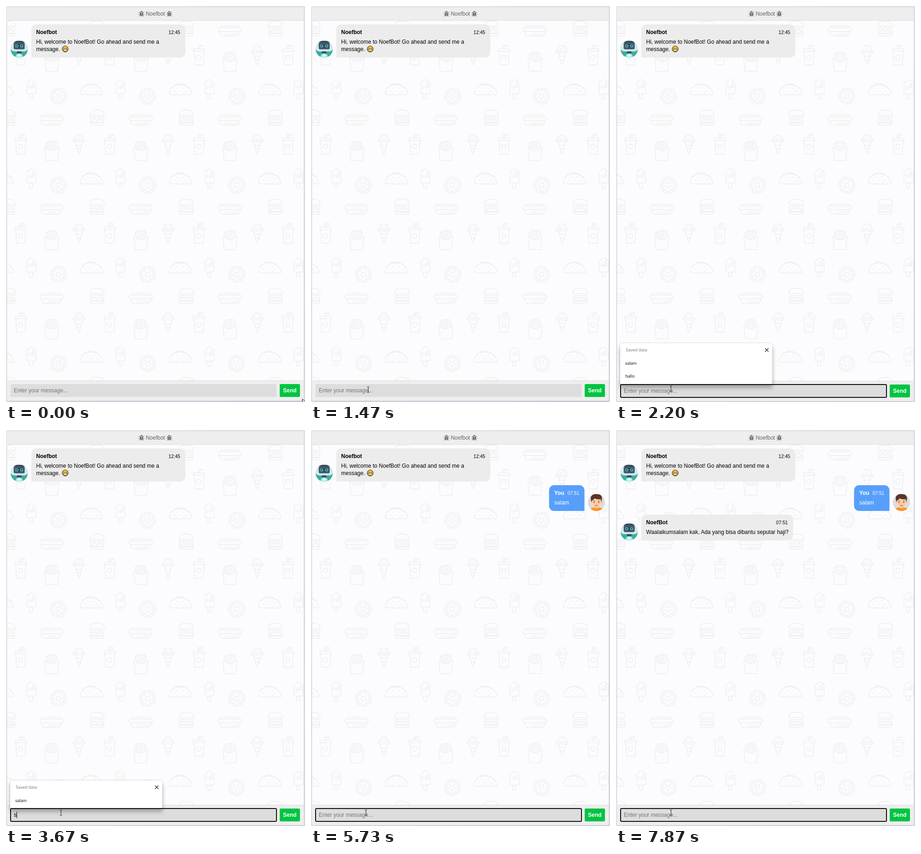
These frames come from a looping animation (650x861 px, 8 s). An HTML page:

```html
<!DOCTYPE html>
<html lang="en">
<head>
<meta charset="utf-8">
<title>Chat window</title>
<style>
html, body { margin: 0; width: 100%; height: 100%; overflow: hidden; }
svg { display: block; width: 650px; height: 861px; }
text { font: 12px "Liberation Sans", Arial, sans-serif; white-space: pre; }
.bold { font-weight: 700; }
.time { font-size: 10.2px; text-anchor: end; }
.mid { text-anchor: middle; }
.popup text { font: 9px "Open Sans", "Noto Sans", sans-serif; }
.line { fill: none; stroke: #ddd; stroke-width: 1.5; stroke-linejoin: round; stroke-linecap: round; }
</style>
</head>
<body>
<svg viewBox="0 0 650 861">
<defs>
  <linearGradient id="page" x1="0" y1="0" x2="1" y2="1">
    <stop offset="0" stop-color="#e9edf4"/><stop offset="1" stop-color="#ccd4e2"/>
  </linearGradient>
  <clipPath id="chatClip"><rect x="2.5" y="32" width="644.5" height="783"/></clipPath>
  <clipPath id="disc"><circle r="18.75"/></clipPath>
  <filter id="shade" x="-10%" y="-30%" width="120%" height="190%">
    <feDropShadow dx="0" dy="0" stdDeviation=".8" flood-opacity=".3"/>
    <feDropShadow dx="0" dy="8" stdDeviation="4.5" flood-opacity=".28"/>
  </filter>

  <g id="food" class="line">
    <!-- ice lolly -->
    <path d="M45 189V168c0-2 2-3 4-3 1-3 4-5 6-5 3 0 4 3 6 4 3 0 4 3 4 6v18c0 2-2 3-4 3-2 0-2-1-4 0H48c-2 0-3-1-3-2zM51 192v8q0 2 2 2h3q2 0 2-2v-8M50 173v7M54 173v4q2 3 4 0v-8q2-2 3 0v9"/>
    <!-- doughnut -->
    <circle cx="114" cy="196" r="17.4"/><circle cx="114" cy="196" r="4.7"/>
    <path id="icing"/>
    <path d="M107 189l2 2M119 188l-1 3M122 196h2M105 198l2-1M111 204l1-2M119 203l2 1"/>
    <!-- taco -->
    <path d="M161.500 189C163 179 170 171 184 171S207 179 210.500 189Q211 193 207 193H166Q161 193 161.500 189zM165 180q0-4 4-4 1-4 5-3 2-4 6-3 4-3 8 0 4-1 6 2 5 0 6 4 5 0 6 5"/>
    <path d="M171 185l2-1M178 179l1 1M184 186h2M190 178l2 1M197 185l2 1M202 189h1M177 190h1M192 190l2-1"/>
    <!-- burger -->
    <path d="M182 238c0-8 6-12 16-12s16 4 16 12zM183 242h30M182 245q3 0 5 3t5-3q3 0 5 3t5-3q3 0 5 3t6-3M184 249q-3 2 0 4h28q3-2 0-4M183 254h30q0 5-5 5h-20q-5 0-5-5z"/>
    <!-- hot dog -->
    <path d="M78 241q0-4 5-4h32q5 0 5 4M77 241h44q3.500 0 3.500 4t-3.500 4H77q-3.500 0-3.500-4t3.500-4zM77 249c0 7 3 10 8 10h28c5 0 8-3 8-10M91 258l3-5M98 258l4-6M105 258l4-6M112 257l3-4"/>
    <!-- drink -->
    <path d="M30 287v-7l1-1h9v3h-7v5M20 287h24q1 0 1 2v3H19v-3q0-2 1-2zM21 292l2 30h18l2-30"/>
    <circle cx="31.500" cy="305.500" r="5"/>
    <!-- fries -->
    <path d="M84 307l3 29h25l3-29h-4c0 10-23 10-23 0zM87 306v-8h4v12M91 299v-4h4v17M95 297v-3h4v19M99 295h4v17M103 294h4v17M107 297h4v9"/>
    <!-- cone -->
    <path d="M149 291c0-7 3-11 9.500-11s9.500 4 9.500 11M147 291h23q2 0 2 2t-2 2h-23q-2 0-2-2t2-2zM150 295l7.500 26h2l7.500-26M152 303h13M155 311h8M154 287h2M160 285h2"/>
  </g>

  <g id="bot" clip-path="url(#disc)">
    <circle r="19" fill="#3fae99"/>
    <path d="M-20-20h40V-2Q17 5 10 5H-10Q-17 5-20-2z" fill="#d5e9ed"/>
    <rect x="-11.500" y="-18" width="23" height="5" rx="2" fill="#35495a"/>
    <rect x="-12" y="-14" width="24" height="14.500" rx="3" fill="#46606f"/>
    <rect x="-10" y="-11.500" width="20" height="9.500" rx="4.500" fill="#33495a"/>
    <g fill="#33495a" stroke="#60c9cf" stroke-width="1.400"><circle cx="-5.300" cy="-6.800" r="2.500"/><circle cx="5.300" cy="-6.800" r="2.500"/></g>
    <path d="M-5 5H5v4H-5z" fill="#334c5d"/>
    <path d="M-8 20q0-10 6-10h4q6 0 6 10z" fill="#b0eaee"/>
    <circle cy="14" r="2.500" fill="#e9ffff"/>
  </g>

  <g id="user" clip-path="url(#disc)">
    <circle r="19" fill="#ddd"/>
    <path d="M-15 20q0-8 9-9H6q9 1 9 9z" fill="#ff921f"/>
    <path d="M-4 7H4v5q-4 4-8 0z" fill="#eeb58b"/>
    <circle cx="-10" cy="-1" r="2.500" fill="#f6bd94"/><circle cx="10" cy="-1" r="2.500" fill="#f6bd94"/>
    <path d="M-10-9H10V0q0 6-5 9-5 3-10 0-5-3-5-9z" fill="#ffcda5"/>
    <path d="M-11-1q-3-11 1-14 4-4 12-3 10 0 10 9l-1 8-2-6Q1-6-4-9q-2 4-5 4z" fill="#583528"/>
    <path d="M-7-3h4M3-3h4M-3 6q3 2 6 0" fill="none" stroke="#70462f" stroke-width="1.100"/>
    <circle cx="-5" r="1.100" fill="#45291f"/><circle cx="5" r="1.100" fill="#45291f"/>
  </g>

  <g id="bug" fill="#666" stroke="#666">
    <path d="M-2.600-3.400a2.600 2.600 0 0 1 5.200 0z" stroke="none"/>
    <path d="M-3.200-2.500H-.4V5.500Q-3.200 5-3.200 1.500zM3.200-2.500H.4V5.500Q3.200 5 3.200 1.500z" stroke="none"/>
    <path d="M-3-1.500L-5.300-4M3-1.500L5.300-4M-3 .8h-3.200M3 .8h3.200M-3 3l-2.300 2.500M3 3l2.300 2.500" stroke-width="1.100"/>
  </g>
</defs>

<rect width="650" height="861" fill="url(#page)"/>
<rect id="under" x="6" y="858" width="638" height="3" fill="#000" opacity=".06"/>
<rect id="panel" x="2" y="2.500" width="645.500" height="855.500" rx="3.500" fill="#fcfcfe" stroke="#ddd"/>
<g clip-path="url(#chatClip)"><g id="tiles" opacity=".45"></g></g>
<path d="M2.500 31V6q0-3 3-3H644q3 0 3 3V31z" fill="#eee"/>
<path d="M2.500 31.500H647" stroke="#ddd"/>
<use href="#bug" x="294.500" y="17"/><use href="#bug" x="355" y="17"/>
<text class="mid" x="324.700" y="21" fill="#666">Noefbot</text>

<path d="M55 112V51.250A11.250 11.250 0 0 1 66.250 40H378.750A11.250 11.250 0 0 1 390 51.250V101A11.250 11.250 0 0 1 378.750 112z" fill="#ececec"/>
<use href="#bot" x="28.700" y="93.700"/>
<text class="bold" x="65.500" y="61">Noefbot</text>
<text class="time" x="378.800" y="61">12:45</text>
<text x="65.500" y="82">Hi, welcome to NoefBot! Go ahead and send me a</text>
<text x="65.500" y="98">message.</text>
<g transform="translate(128.700 93.500)" stroke="#1a1608">
  <circle r="6.600" fill="#ffc93a"/>
  <path d="M-4.300.500H4.300Q3.800 4.600 0 4.600T-4.300.500z" fill="#fff" stroke-width=".9"/>
  <path d="M-4.300-1.500q1.500-2.500 3 0M1.300-1.500q1.500-2.500 3 0" fill="none" stroke-width=".9"/>
</g>

<g id="sent">
  <path d="M594.500 176H528.750A11.250 11.250 0 0 1 517.500 164.750V131.250A11.250 11.250 0 0 1 528.750 120H583.250A11.250 11.250 0 0 1 594.500 131.250z" fill="#579ffb"/>
  <use href="#user" x="620.500" y="157.500"/>
  <g fill="#fff">
    <text class="bold" x="528.800" y="141">You</text>
    <text class="time" x="583.300" y="141">07:51</text>
    <text x="528.800" y="162">salam</text>
  </g>
</g>
<g id="reply">
  <path d="M55 240V195.250A11.250 11.250 0 0 1 66.250 184H373.750A11.250 11.250 0 0 1 385 195.250V228.750A11.250 11.250 0 0 1 373.750 240z" fill="#ececec"/>
  <use href="#bot" x="28.700" y="221.500"/>
  <text class="bold" x="65.500" y="205">NoefBot</text>
  <text class="time" x="373.500" y="205">07:51</text>
  <text x="65.500" y="226">Waalaikumsalam kak, Ada yang bisa dibantu seputar haji?</text>
</g>

<g id="footer">
  <path d="M2.500 814H647v41q0 3-3 3H5.500q-3 0-3-3z" fill="#eee"/>
  <path d="M2.500 814.500H647" stroke="#ddd"/>
  <rect x="10" y="822" width="578" height="28" rx="2.200" fill="#ddd"/>
  <rect id="ring" x="10" y="822" width="578" height="28" rx="2.200" fill="none" stroke="#101010" stroke-width="2"/>
  <rect x="595" y="822" width="44" height="28" rx="2.200" fill="#00c441"/>
  <text class="bold mid" x="617" y="840" fill="#fff">Send</text>
  <text id="hint" x="17" y="840" fill="#757575">Enter your message...</text>
  <text id="typed" x="17" y="840"></text>
  <rect id="caret" y="829" width="1" height="14"/>
</g>

<g id="popup" class="popup">
  <rect id="card" x="9" width="331" rx="3" fill="#fff" filter="url(#shade)"/>
  <g id="cardHead">
    <text x="21.500" y="18" fill="#70757a">Saved data</text>
    <path d="M324 11l7.500 7.500m0-7.500l-7.500 7.500" stroke="#222" stroke-width="1.100"/>
  </g>
  <text id="rowA" x="20">salam</text>
  <text id="rowB" x="20" y="808">hallo</text>
</g>

<path id="arrow" d="M0 0V13L3.200 10.200 5.400 15.200 7.600 14.200 5.400 9.400H9.500z" fill="#fff" stroke="#111"/>
<path id="beam" d="M-2.500-6H-1L0-5.500 1-6H2.500M0-5.500V5.500M-2.500 6H-1L0 5.500 1 6H2.500" fill="none" stroke="#222"/>
</svg>

<script>
const FPS = 15, COUNT = 120, TILE = 193.75;
const $ = id => document.getElementById(id);
const set = (id, attrs) => { for (const k in attrs) $(id).setAttribute(k, attrs[k]); };
const show = (id, on) => set(id, { visibility: on ? "visible" : "hidden" });
const mix = (a, b, u) => a + (b - a) * u;
const clamp = u => Math.max(0, Math.min(1, u));

function wavyRing(cx, cy, r, wave, lobes) {
  let d = "";
  for (let i = 0; i <= 72; i++) {
    const a = i / 72 * 2 * Math.PI, q = r + wave * Math.sin(a * lobes);
    d += (i ? "L" : "M") + (cx + q * Math.cos(a)).toFixed(2) + " " + (cy + q * Math.sin(a)).toFixed(2);
  }
  return d + "z";
}
set("icing", { d: wavyRing(114, 196, 13.2, 1.1, 9) });

let uses = "";
for (let row = -1; row < 4; row++)
  for (let col = -1; col < 4; col++)
    uses += `<use href="#food" x="${col * TILE}" y="${row * TILE}"/>`;
$("tiles").innerHTML = uses;

// All times below are steps of 1/15 s
const word = "salam", keys = [55, 56, 58, 59, 62];
const FOCUS = 26, CLOSE = 63, SEND = 66, BEAM_BACK = 68, REPLY = 89, BLINK = 8;

function pointer(k) {
  if (k <= 13) {
    const u = k / 13, v = 1 - u;
    const curve = (a, b, c) => v * v * a + 2 * u * v * b + u * u * c;
    return [curve(645, 340, 218), curve(855, -26, 648)];
  }
  if (k < FOCUS) {
    const u = 1 - (1 - clamp((k - 13) / 9)) ** 2;
    return [mix(218, 124.5, u), mix(648, 834, u)];
  }
  const u = clamp((k - FOCUS + 1) / 4);
  return [mix(124.5, 119.5, u), mix(834, 832, u)];
}

function drawPopup(k) {
  const fade = k < CLOSE ? clamp((k - 27) / 4) : clamp(0.55 - (k - CLOSE) * 0.43);
  const scale = mix(0.96, 1, fade), short = k >= keys[0];
  const top = short ? 762 : 733;
  show("popup", fade > 0);
  set("popup", {
    opacity: fade,
    transform: `translate(174.5 822) scale(${scale}) translate(-174.5 -822)`
  });
  set("card", { y: top, height: 822 - top });
  set("cardHead", { transform: `translate(0 ${top})` });
  set("rowA", { y: top + 47 });
  $("rowB").style.display = short ? "none" : "";
}

function draw(k) {
  const focused = k >= FOCUS, down = focused ? 1 : 0;
  set("panel", { height: 855.5 + down });
  set("under", { y: 858 + down });
  set("footer", { transform: `translate(0 ${down})` });
  show("ring", focused);

  const done = keys.filter(s => k >= s);
  const text = k < SEND ? word.slice(0, done.length) : "";
  $("typed").textContent = text;
  show("hint", !text);
  const since = k - (done.length ? done[done.length - 1] : FOCUS - 1);
  const width = text ? $("typed").getComputedTextLength() : 0;
  set("caret", { x: Math.round(17 + width) });
  show("caret", focused && Math.floor(since / BLINK) % 2 === 0);

  drawPopup(k);
  show("sent", k >= SEND);
  show("reply", k >= REPLY);

  const [x, y] = pointer(k);
  const beam = y > 822 && k > 13 && !(k >= CLOSE && k < BEAM_BACK);
  show("beam", beam);
  show("arrow", !beam);
  set("beam", { transform: `translate(${Math.floor(x) + 0.5} ${Math.round(y)})` });
  set("arrow", { transform: `translate(${Math.floor(x) - 0.5} ${Math.round(y) - 0.5})` });
}

const start = performance.now();
function tick(now) {
  const ms = Math.max(0, now - start);
  draw(Math.floor((ms + 5) * FPS / 1000) % COUNT);
  requestAnimationFrame(tick);
}
draw(0);
requestAnimationFrame(tick);
</script>
</body>
</html>
```
